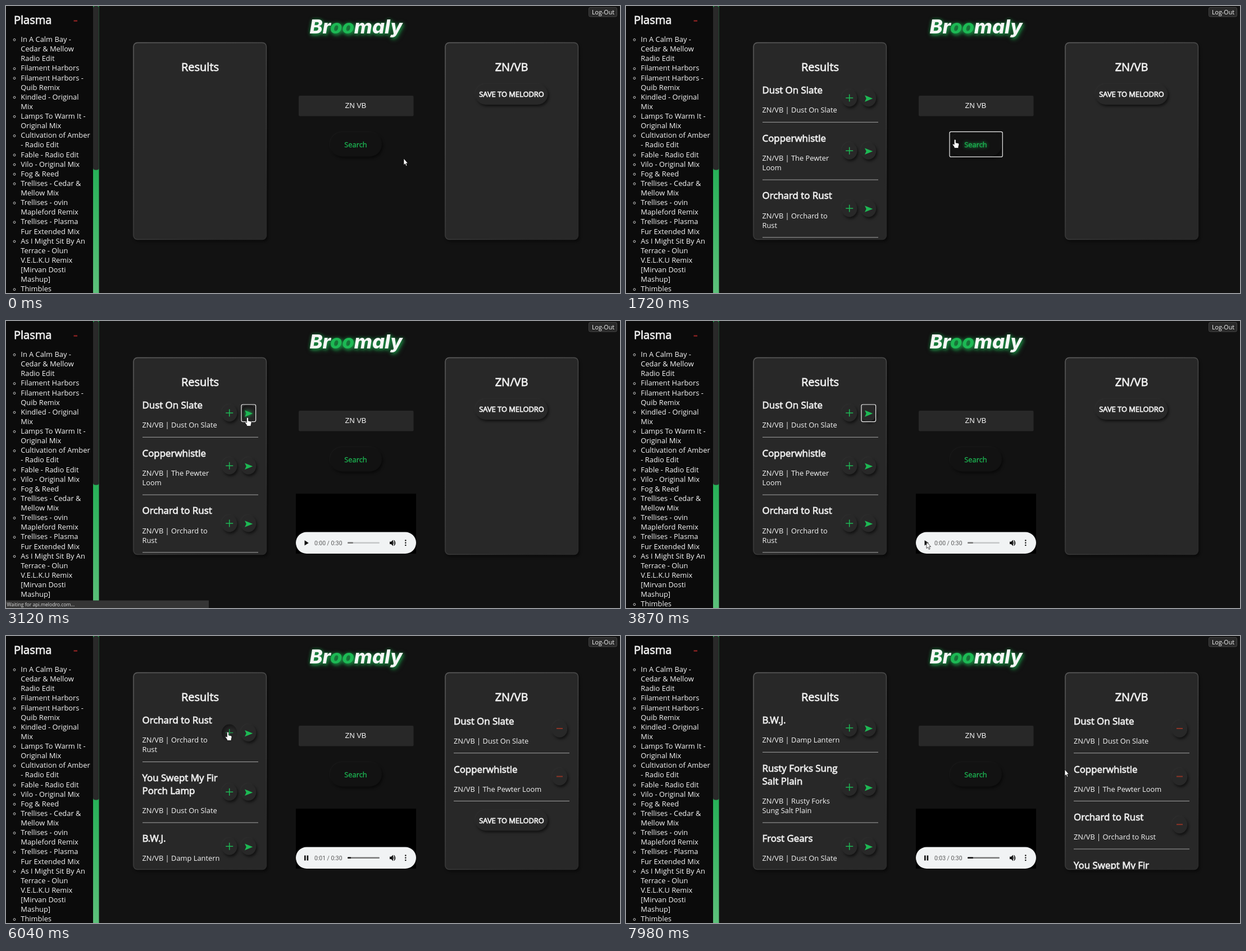
These frames come from a looping animation (1093x512 px, 8 s). An HTML page:

```html
<!DOCTYPE html>
<html lang="en">
<head>
<meta charset="utf-8">
<title>Playlist builder</title>
<style>
  html, body { margin: 0; width: 100%; height: 100%; overflow: hidden; background: #121212; }
  svg { display: block; font: 12.87px "Open Sans", sans-serif; fill: #f6f6f6; }
  text { white-space: pre; }
  .bold { stroke: #eee; stroke-width: .8px; fill: #eee; }
  .head { font-size: 20px; }
  .song { font-size: 16.9px; }
  .mid { text-anchor: middle; }
  .logo { font: italic 800 34.6px Inter, sans-serif; filter: drop-shadow(0 0 3px #1db95480) drop-shadow(2px 3px 3px #1db954aa); }
  .green { fill: #1db954; }
  .raised { filter: drop-shadow(2px 3px 2px #0009) drop-shadow(-1px -1px 1px #ffffff0a); }
  .glow { filter: drop-shadow(0 0 3px #1db954); }
  .focus { fill: none; stroke: #eee; stroke-width: 1.2px; }
</style>
</head>
<body>
<svg width="1093" height="512" viewBox="0 0 1093 512">
  <defs>
    <linearGradient id="track" x2="0" y2="1">
      <stop offset=".1" stop-color="#1db954"/><stop offset=".57" stop-color="#27b058"/><stop offset="1" stop-color="#5cc07a"/>
    </linearGradient>
    <linearGradient id="edge" x2=".6" y2="1">
      <stop stop-color="#606060"/><stop offset=".6" stop-color="#444"/><stop offset="1" stop-color="#2a2a2a"/>
    </linearGradient>
    <radialGradient id="dent" cx=".6" cy=".62" r=".65">
      <stop offset=".5" stop-color="#262626"/><stop offset="1" stop-color="#141414"/>
    </radialGradient>
    <clipPath id="leftClip"><rect x="228" y="66" width="235" height="350"/></clipPath>
    <clipPath id="rightClip"><rect x="783" y="66" width="235" height="350"/></clipPath>
  </defs>
  <rect width="155" height="512" fill="#0b0b0b"/>
  <g id="sidebar"></g>
  <rect x="155" width="10.5" height="512" fill="url(#track)"/>
  <rect x="155" y="0" width="10.5" height="292.5" rx="4" fill="#292929"/>

  <text class="logo mid" x="623" y="48.5">Br<tspan class="green">oo</tspan>maly</text>
  <rect x="1037.5" y="2.5" width="50" height="16.5" rx="2.5" fill="#292929" stroke="#444"/>
  <text class="mid" x="1063" y="14.8" font-size="10.7">Log-Out</text>

  <g fill="#282828" stroke="url(#edge)" stroke-width="1.4" class="raised">
    <rect x="227" y="65.5" width="236.5" height="351" rx="7"/>
    <rect x="782" y="65.5" width="236.5" height="351" rx="7"/>
  </g>
  <text class="head bold mid" x="345.5" y="115.5">Results</text>
  <text class="head bold mid" x="900" y="116">ZN/VB</text>

  <rect x="521" y="160" width="204.5" height="36.5" rx="2" fill="#282828"/>
  <text class="mid" x="622.5" y="181.7" font-family="Liberation Sans, Arial, sans-serif">ZN VB</text>

  <g id="search"></g>
  <g id="results" clip-path="url(#leftClip)"></g>
  <g id="playlist" clip-path="url(#rightClip)"></g>
  <g id="player"></g>
  <g id="status"></g>
  <g id="cursor"></g>
</svg>
<script>
const LOOP = 8000;
const BAND = "ZN/VB";
// title lines, then album lines, as wrapped in the narrow column
const SONGS = [
  [["Dust On Slate"], ["Dust On Slate"]],
  [["Copperwhistle"], ["The Pewter", "Loom"]],
  [["Orchard to Rust"], ["Orchard to", "Rust"]],
  [["You Swept My Fir", "Porch Lamp"], ["Dust On Slate"]],
  [["B.W.J."], ["Damp Lantern"]],
  [["Rusty Forks Sung", "Salt Plain"], ["Rusty Forks", "Sung Salt Plain"]],
  [["Frost Gears"], ["Dust On Slate"]],
];
const TRACKS = [
  "In A Calm Bay -|Cedar & Mellow|Radio Edit", "Filament Harbors", "Filament Harbors -|Quib Remix",
  "Kindled - Original|Mix", "Lamps To Warm It -|Original Mix", "Cultivation of Amber|- Radio Edit",
  "Fable - Radio Edit", "Vilo - Original Mix", "Fog & Reed", "Trellises - Cedar &|Mellow Mix",
  "Trellises - ovin|Mapleford Remix", "Trellises - Plasma|Fur Extended Mix",
  "As I Might Sit By An|Terrace - Olun|V.E.L.K.U Remix|[Mirvan Dosti|Mashup]", "Thimbles",
];
// time, x, y of the pointer tip
const PATH = [
  [0, 708, 272], [170, 708, 272], [550, 642, 250], [1530, 643, 250], [1720, 586, 238],
  [2310, 447, 186], [2520, 430, 172], [3250, 430, 172], [3870, 535, 394], [4150, 535, 394],
  [4780, 400, 183], [4820, 400, 183], [5020, 395, 171], [6100, 395, 171], [6380, 395, 174],
  [7730, 395, 174], [7980, 781, 238], [LOOP, 781, 238],
];
const PRESSES = [5160, 5900, 6660, 7400];
const PRESS_TIME = 140, PLAY_START = 4380;

const $ = id => document.getElementById(id);
const esc = s => s.replace(/&/g, "&amp;");
const text = (x, y, s, cls = "", more = "") => `<text x="${x}" y="${y}" class="${cls}" ${more}>${esc(s)}</text>`;
const rect = (x, y, w, h, more = "") => `<rect x="${x}" y="${y}" width="${w}" height="${h}" ${more}/>`;
const between = (t, a, b) => t >= a && t < b;

const shown = {};
function put(id, html) {
  if (shown[id] !== html) $(id).innerHTML = shown[id] = html;
}

function pointer(t) {
  const i = Math.max(1, PATH.findIndex(p => p[0] > t));
  const [a, b] = [PATH[i - 1], PATH[i]];
  const k = (t - a[0]) / (b[0] - a[0]);
  return { x: a[1] + (b[1] - a[1]) * k, y: a[2] + (b[2] - a[2]) * k };
}

const inside = (p, x, y, rx, ry) => Math.abs(p.x - x) < rx && Math.abs(p.y - y) < ry;

function sidebar() {
  let y = 64;
  let html = text(14, 31.5, "Plasma", "head bold") + rect(120.5, 25.3, 6.5, 2.4, 'fill="#8a2222"');
  for (const track of TRACKS) {
    html += `<circle cx="15" cy="${y - 3.7}" r="1.9" fill="none" stroke="#ddd" stroke-width=".9"/>`;
    for (const line of track.split("|")) {
      html += text(26.3, y, line);
      y += 17.13;
    }
  }
  return html;
}

function roundButton(x, y, hover) {
  return `<ellipse cx="${x}" cy="${y}" rx="13.8" ry="15.3" ` +
    (hover ? 'fill="url(#dent)"/>' : 'fill="#282828" class="raised"/>');
}

const focusBox = (x, y, w, h) => rect(x, y, w, h, 'rx="2.5" class="focus"');

function songText(x, y, titles, albums) {
  let html = titles.map((s, i) => text(x, y + 6 + 22.9 * i, s, "song bold")).join("");
  const top = y + 40.2 + 22.9 * (titles.length - 1);
  return html + albums.map((s, i) => text(x, top + 17.15 * i, i ? s : `${BAND} | ${s}`)).join("");
}

const divider = (x, y) => rect(x, y, 206, 1, 'fill="#a4a4a4"');

function results(t, added, p) {
  if (t < 1110) return { html: "", hand: false };
  let y = 150, html = "", hand = false;
  SONGS.slice(added, added + 4).forEach(([titles, albums], i) => {
    const extra = 22.9 * (titles.length - 1) + 17.15 * (albums.length - 1);
    const cy = y + 14.3 + extra / 2;
    const overAdd = inside(p, 397.7, cy, 13.8, 15.3);
    const overPlay = inside(p, 431.5, cy, 13.8, 15.3);
    hand = hand || overAdd || overPlay;
    html += songText(242.5, y, titles, albums) + divider(243, y + 56.8 + extra);
    html += roundButton(397.7, cy, overAdd) +
      `<path d="M391.2 ${cy - .3}h13m-6.5 -6.5v13" stroke="#1db954" stroke-width="1.5" opacity="${overAdd ? .75 : 1}"/>`;
    html += roundButton(431.5, cy, overPlay) +
      `<path d="M425 ${cy - 5}l14.3 5.8l-14.3 5.8l2.7 -5.8z" class="green${overPlay ? " glow" : ""}"/>`;
    if (i === 0) {
      if (between(t, 2740, 4010)) html += focusBox(419, cy - 15.3, 25.6, 30.6);
      if (PRESSES.some(s => between(t, s, s + PRESS_TIME))) html += focusBox(384.5, cy - 15.3, 26.5, 30.6);
    }
    y += 85.6 + extra;
  });
  return { html, hand };
}

function playlist(added) {
  let y = 152, html = "";
  for (const [titles, albums] of SONGS.slice(0, added)) {
    const extra = 22.9 * (titles.length - 1);
    html += songText(797, y, titles, [albums.join(" ")]) + divider(797, y + 56.3 + extra) +
      roundButton(985.5, y + 13.7 + extra / 2, false) +
      rect(980, y + 12 + extra / 2, 11, 2, 'fill="#8c3426"');
    y += 85.6 + extra;
  }
  return html + rect(835.5, y - 13, 129, 37, 'rx="18.5" fill="#282828" class="raised"') +
    text(900, y + 10.3, "SAVE TO MELODRO", "bold mid");
}

function search(t, hover) {
  return rect(577, 225, 92, 43.5, 'rx="21.7" fill="#121212" class="raised"') +
    text(622.5, 251.6, "Search", "green mid" + (hover ? " glow" : ""), 'stroke="#1db954" stroke-width=".3"') +
    (between(t, 970, 2740) ? focusBox(576, 224.4, 94.3, 44.8) : "");
}

function player(t) {
  if (t < 2880) return "";
  const seconds = Math.max(0, (t - PLAY_START) / 1000);
  const playing = t >= 4150;
  const tip = 3.3 + 1.95 * Math.floor(seconds * 2) / 2;
  const bar = (w, fill) => rect(608, 394.5, w, 2.4, `rx="1.2" fill="${fill}"`);
  return rect(516, 308, 214, 107, 'fill="#000"') +
    rect(516, 376.5, 214, 38.5, 'rx="19.2" fill="#f1f3f4"') +
    `<path fill="#111" d="${playing ? "M531 391.5h2.6v9h-2.6zM535.6 391.5h2.6v9h-2.6z" : "M531.5 391.2v9.4l7.3 -4.7z"}"/>` +
    text(549, 399.6, `0:0${Math.floor(seconds)} / 0:30`, "", 'fill="#5a5a5a" font-family="Roboto, sans-serif" font-size="10.4"') +
    bar(57, playing ? "#777" : "#c4c6c7") + (playing ? bar(tip, "#111") : bar(10, "#777")) +
    `<path fill="#111" d="M683 393.8h2.6l3.4 -3.4v11l-3.4 -3.4h-2.6z"/>
     <path fill="none" stroke="#111" stroke-width="1.2" d="M690 393.6q2 2.3 0 4.6M690.4 391.2q5.2 4.7 0 9.4"/>` +
    [391.6, 395.8, 400].map(y => `<circle cx="711.3" cy="${y}" r="1.25" fill="#111"/>`).join("");
}

function status(t) {
  if (!between(t, 2880, 3700)) return "";
  return rect(0, 498.5, 361, 13.5, 'fill="#353535"') +
    text(1.5, 508.8, "Waiting for api.melodro.com...", "", 'font-size="8.6" fill="#ddd"');
}

function cursor(p, hand) {
  const shape = hand
    ? "M-1.6 1Q0 -.8 1.4 1V6L5.6 6.9Q7.3 7.4 7 9.4L6 13.2V15.6H-1.2L-1.6 13.6L-4.4 9.6Q-4.4 7.6 -2.6 8.4L-1.6 9.4Z"
    : "M0 0V11.6L2.5 9.4L4.3 13.4L6.1 12.6L4.4 8.7H7.6Z";
  return `<path transform="translate(${p.x.toFixed(1)} ${p.y.toFixed(1)})" d="${shape}" fill="#fff" stroke="#000" stroke-width=".7"/>`;
}

function draw(now) {
  const t = now % LOOP;
  const p = pointer(t);
  const added = PRESSES.filter(s => t >= s + PRESS_TIME).length;
  const overSearch = inside(p, 623, 246.7, 46, 21.7) || inside(p, 642, 250, 2, 1);
  const list = results(t, added, p);
  put("search", search(t, overSearch));
  put("results", list.html);
  put("playlist", playlist(added));
  put("player", player(t));
  put("status", status(t));
  put("cursor", cursor(p, overSearch || list.hand));
  requestAnimationFrame(draw);
}

put("sidebar", sidebar());
draw(0);
</script>
</body>
</html>
```
